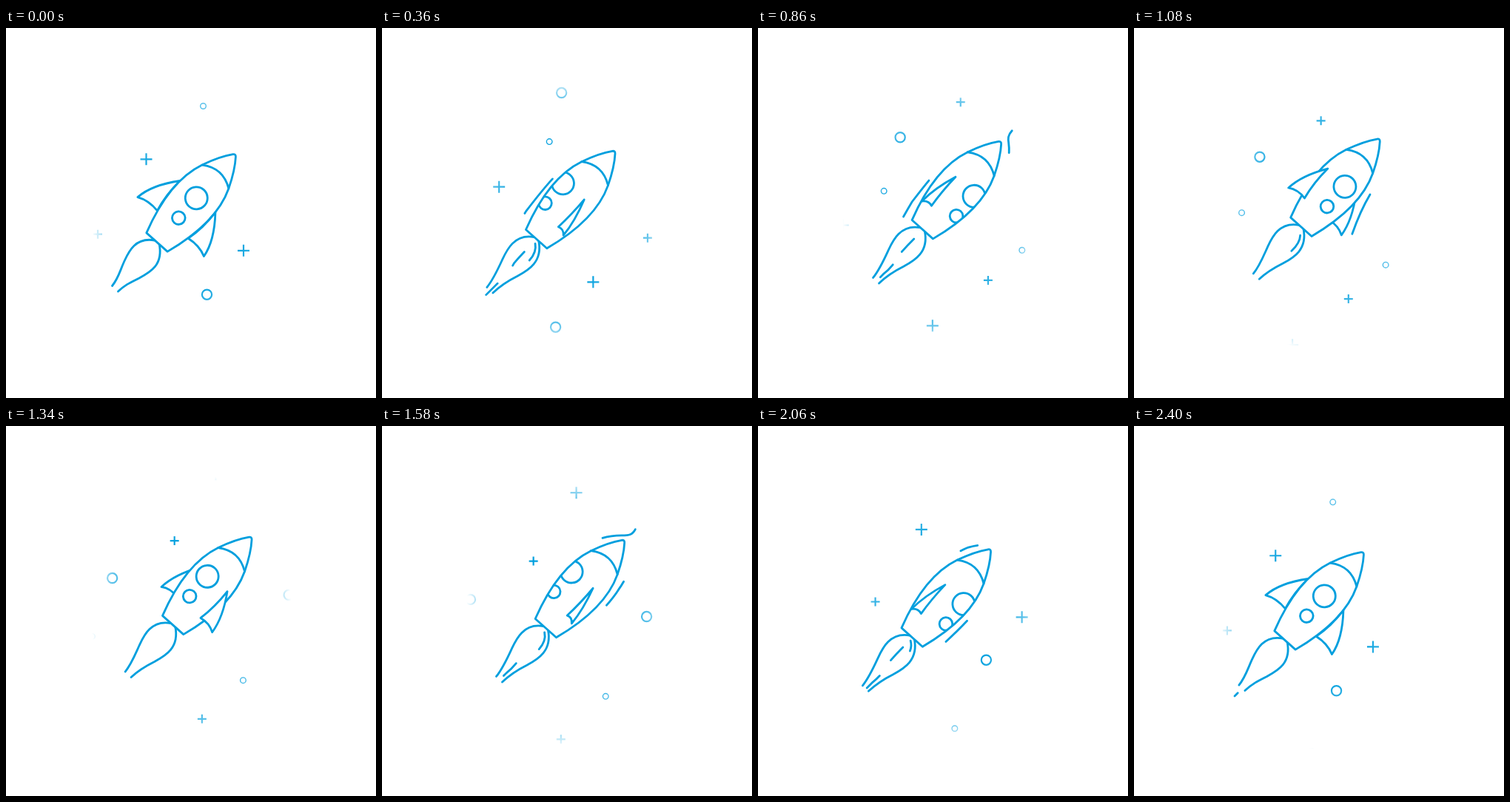
Recreate the animation shown at these times as an HTML page with a canvas. Size 500 by 500 pixels, loop 2.42 s.

```html
<!DOCTYPE html>
<html>
<head>
<meta charset="utf-8">
<style>
html, body { margin: 0; height: 100%; overflow: hidden; background: #fff; }
canvas { display: block; }
</style>
</head>
<body>
<canvas id="stage" width="500" height="500"></canvas>
<script>
const ctx = document.getElementById('stage').getContext('2d');
const BLUE = '#009fde', LOOP = 2420, TURN = 1200, STREAK_SPEED = 0.57, STAR_SLOPE = 1.192;

// Position at time 0 and leftward speed in px/ms; all stars fall along the same slope.
const STARS = [
  { shape: plus, size: 8, x: 189.5, y: 177.3, speed: 0.087 },
  { shape: plus, size: 8, x: 321, y: 300.8, speed: 0.099 },
  { shape: plus, size: 6, x: 124, y: 278.7, speed: 0.096 },
  { shape: plus, size: 6, x: 393.5, y: 242.5, speed: 0.096 },
  { shape: ring, size: 6.6, x: 271.5, y: 360.2, speed: 0.1025 },
  { shape: ring, size: 6.6, x: 279, y: 44.2, speed: 0.101 },
  { shape: ring, size: 3.8, x: 266.5, y: 105.5, speed: 0.112 },
  { shape: ring, size: 3.8, x: 422, y: 222.6, speed: 0.0758 }
];

// Streaks enter their path at the given times and run along it.
const STREAKS = [
  { length: 60, starts: [50, 515, 1496],
    path: 'M325 156C318 170 307 160 280 168C245 182 220 213 190 252Q178 272 165 297' },
  { length: 24, starts: [1955], path: 'M325 156C318 170 307 160 280 168C245 182 220 213 190 252' },
  { length: 60, starts: [805], path: 'M325 156C316 166 322 170 321 185C319 210 312 224 302 238Q286 262 273 299' },
  { length: 40, starts: [1380, 1770], path: 'M325 156C316 166 322 170 321 185C319 210 312 224 302 238Q288 260 249 296' },
  { length: 24, starts: [192, 290, 723, 802, 1443, 1913, 2000, 2204],
    path: 'M199 296Q186 308 174 322Q164 340 151 350L136 365' },
  { length: 25, starts: [313, 1024, 1534, 2035], path: 'M202 294Q206 308 191 322' }
].map(s => ({ ...s, path: new Path2D(s.path) }));

const body = new Path2D('M-19 0C-32 -40 -39 -82 -24 -118.6C-18 -133 -9 -149 -2.5 -157' +
  'Q0 -160 2.5 -157C9 -149 18 -133 24 -118.6C39 -82 32 -40 19 0Z');
const noseLine = new Path2D('M-24 -118.6Q0 -135 24 -118.6');

function plus(x, y, r) {
  ctx.moveTo(x - r, y); ctx.lineTo(x + r, y);
  ctx.moveTo(x, y - r); ctx.lineTo(x, y + r);
}

function ring(x, y, r) {
  ctx.moveTo(x + r, y);
  ctx.arc(x, y, r, 0, 2 * Math.PI);
}

function drawStar({ shape, size, x, y, speed }, t) {
  const shift = speed * t;
  ctx.lineWidth = size < 5 ? 1.4 : 2.2;
  ctx.beginPath();
  shape(x - shift, y + STAR_SLOPE * shift, size);
  ctx.stroke();
}

function fadeEdges() {
  ctx.save();
  ctx.globalCompositeOperation = 'destination-in';
  ctx.translate(250, 250);
  ctx.scale(138, 190);
  const fade = ctx.createRadialGradient(0, 0, 0, 0, 0, 0.985);
  fade.addColorStop(0.5, '#000');
  fade.addColorStop(0.81, 'rgba(0,0,0,0.63)');
  fade.addColorStop(1, 'rgba(0,0,0,0)');
  ctx.fillStyle = fade;
  ctx.fillRect(-2, -2, 4, 4);
  ctx.restore();
}

// The bulb stays at the nozzle while the tail stretches.
function drawFlame(t) {
  const tail = 7 * Math.sqrt(Math.sin(Math.PI * (t % 1210) / 1210)), mid = tail / 4;
  ctx.beginPath();
  ctx.moveTo(201, 287);
  ctx.bezierCurveTo(174, 282, 165 - mid, 304 + mid, 159.5 - mid, 316 + mid);
  ctx.bezierCurveTo(154 - mid, 328 + mid, 152 - tail, 338 + tail, 143.5 - tail, 348.5 + tail);
  ctx.moveTo(207, 291.5);
  ctx.bezierCurveTo(213, 320, 195 - mid, 330 + mid, 180 - mid, 338 + mid);
  ctx.bezierCurveTo(168 - mid, 344 + mid, 161 - tail, 347 + tail, 151.5 - tail, 356 + tail);
  ctx.stroke();
}

function drawStreaks(t) {
  for (const { path, length, starts } of STREAKS) {
    ctx.setLineDash([length, 9999]);
    for (const start of starts) {
      const head = (t - start) * STREAK_SPEED;
      if (head <= 0) continue;
      ctx.lineDashOffset = length - head;
      ctx.stroke(path);
    }
  }
  ctx.setLineDash([]);
}

// side goes from 1 (full right) to -1 (full left).
function drawFin(side) {
  ctx.beginPath();
  ctx.moveTo(32 * side, -82.7);
  ctx.quadraticCurveTo(57 * side, -53, 60 * side, -28);
  ctx.quadraticCurveTo(46 * side, -35, 28 * side, -32);
  ctx.quadraticCurveTo(34 * side, -56, 32 * side, -82.7);
  ctx.fill();
  ctx.stroke();
}

function drawWindows(turn) {
  ctx.save();
  ctx.clip(body);
  ctx.beginPath();
  for (const x of [-78 * turn, 78 * (1 - turn)]) {
    ring(x, -80, 15);
    ring(x, -44, 8.8);
  }
  ctx.stroke();
  ctx.restore();
}

function drawRocket(t) {
  const turn = t % TURN / TURN, side = 1 - 2 * turn;
  const drift = 1 - Math.cos(Math.PI * t / TURN);
  ctx.save();
  ctx.lineWidth = 2.8;
  ctx.translate(11.2 * drift, -10.6 * drift);
  drawFlame(t);
  drawStreaks(t);
  ctx.translate(204, 289.5);
  ctx.rotate(0.7287);
  drawFin(-side);
  ctx.fill(body);
  drawWindows(turn);
  ctx.stroke(noseLine);
  ctx.stroke(body);
  drawFin(side);
  ctx.restore();
}

function draw(now) {
  const t = Math.floor(now % LOOP / 20) * 20;
  ctx.clearRect(0, 0, 500, 500);
  ctx.strokeStyle = BLUE;
  ctx.fillStyle = '#fff';
  ctx.lineJoin = 'round';
  ctx.lineCap = 'butt';
  for (const star of STARS) {
    drawStar(star, t);
    drawStar(star, t - LOOP);
  }
  fadeEdges();
  ctx.fillStyle = '#fff';
  ctx.lineCap = 'round';
  drawRocket(t);
  requestAnimationFrame(draw);
}
requestAnimationFrame(draw);
</script>
</body>
</html>
```
